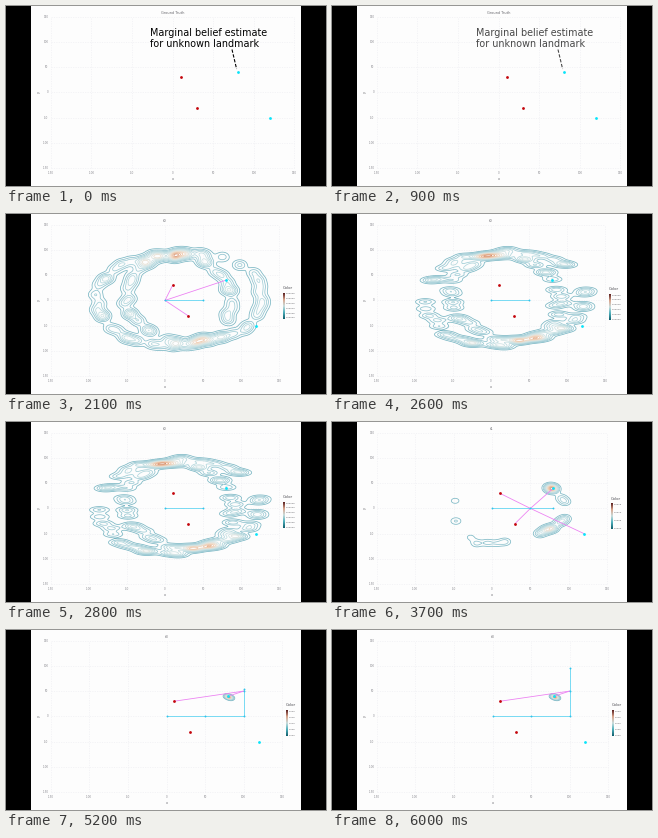
A matplotlib script that plays this animation: 320 by 180 pixels, repeating every 6.1 s.

```python
import numpy as np
import matplotlib.pyplot as plt
from matplotlib.animation import FuncAnimation
from matplotlib.colors import LinearSegmentedColormap
from matplotlib.patches import Rectangle

W, H, DPI = 320, 180, 100
PX = 72 / DPI
FRAMES, INTERVAL = 61, 100
SPEED = 5  # data units per frame
Y0, UNIT_Y = 86.4, 0.506

RED, CYAN, PINK, GREY = "#c4060c", "#08e4fa", "#ec80f2", "#8c8c92"
HEAT = LinearSegmentedColormap.from_list(
    "heat", ["#62a9b8", "#8fc3ce", "#b4d8de", "#d3e4e4", "#ecdccb", "#eebf9c", "#cf7f5c"])
BAR = LinearSegmentedColormap.from_list(
    "bar", ["#12606e", "#4fb0bc", "#c9dcdc", "#d9a58c", "#5c2020"])

KNOWN = [(10, 30), (30, -30)]
UNKNOWN = [(80, 40), (120, -50)]

fig = plt.figure(figsize=(W / DPI, H / DPI), dpi=DPI, facecolor="black")
ax = fig.add_axes([0, 0, 1, 1])
ax.axis("off")
ax.add_patch(Rectangle((25, 0), 270, H, color="#fdfdfd", lw=0, zorder=0))


def label(x, y, text, size, color=GREY, **kw):
    kw = {"ha": "center", "va": "center", **kw}
    return ax.text(x, y, text, fontsize=size * PX, color=color,
                   family="DejaVu Sans", **kw)


def ring(rng, cx, cy, r, n, gaps=(), hot=0):
    """Kernels (x, y, weight) scattered along a circle, heavier near one angle."""
    out = []
    for a in np.linspace(0, 360, n, endpoint=False) + rng.uniform(-4, 4, n):
        a %= 360
        if any(lo < a < hi for lo, hi in gaps):
            continue
        off = abs((a - hot + 180) % 360 - 180)
        weight = rng.uniform(0.55, 0.85) + 0.35 * np.exp(-(off / 14) ** 2)
        rad = r + rng.normal(0, 2.5)
        t = np.radians(a)
        out.append((cx + rad * np.cos(t), cy + rad * np.sin(t), weight))
    return out


class Scene:
    def __init__(self, start, cx, step, title, kernels=(), sigma=(6, 6), low=0.1,
                 legend=None, viewer=None, seen=()):
        self.start, self.cx, self.unit = start, cx, step / 50
        self.items = []
        self.axes(title)
        if kernels:
            self.belief(kernels, sigma, low)
        if legend:
            self.legend(*legend)
        for x, y in seen:
            xs, ys = self.px(np.array([viewer[0], x]), np.array([viewer[1], y]))
            self.add(ax.plot(xs, ys, color=PINK, lw=0.8 * PX, zorder=4))
        for pts, color in ((KNOWN, RED), (UNKNOWN, CYAN)):
            xs, ys = self.px(*np.array(pts).T)
            self.add(ax.plot(xs, ys, "o", color=color, ms=2.8 * PX, mew=0, zorder=6))

    def px(self, x, y):
        return self.cx + x * self.unit, Y0 - y * UNIT_Y

    def add(self, items):
        self.items += items

    def axes(self, title):
        ticks = np.arange(-150, 151, 50)
        xs, ys = self.px(ticks, ticks)
        grid = dict(color="#eeeef2", lw=0.6 * PX, ls=(0, (2, 2)), zorder=1)
        for v, x, y in zip(ticks, xs, ys):
            self.add(ax.plot([x, x], [ys[0], ys[-1]], **grid))
            self.add(ax.plot([xs[0], xs[-1]], [y, y], **grid))
            self.add([label(x, 167, str(v), 2.7),
                      label(42.5, y, str(v), 2.7, ha="right")])
        self.add([label(self.cx, 6.5, title, 3.5, "#66666c"),
                  label(self.cx, 173, "x", 3.5, "#66666c"),
                  label(32.5, Y0, "y", 3.5, "#66666c", rotation=90)])

    def belief(self, kernels, sigma, low):
        gx, gy = np.meshgrid(np.arange(70, 270, 0.5), np.arange(22, 148, 0.5))
        x, y = (gx - self.cx) / self.unit, (Y0 - gy) / UNIT_Y
        z = sum(w * np.exp(-((x - kx) / sigma[0]) ** 2 / 2 - ((y - ky) / sigma[1]) ** 2 / 2)
                for kx, ky, w in kernels)
        z /= z.max()
        self.add([ax.contour(gx, gy, z, levels=np.linspace(low, 0.95, 12), cmap=HEAT,
                             vmin=0, vmax=1, linewidths=0.75 * PX, zorder=3)])

    def legend(self, x, y, values):
        self.add([label(x, y, "Color", 3.8, "#4c4c52", ha="left")])
        self.add([ax.imshow(np.linspace(1, 0, 64)[:, None], cmap=BAR, vmin=0, vmax=1,
                            extent=(x + 0.3, x + 1.7, y + 31, y + 5), aspect="auto", zorder=3)])
        for v, ty in zip(values, np.linspace(y + 6, y + 30, len(values))):
            self.add([label(290, ty, v, 2.4, "#606066", ha="right")])

    def show(self, on):
        for item in self.items:
            item.set_visible(on)


rng = np.random.default_rng(12)
rings = (ring(rng, -1, 0, 89, 42, [(318, 326)], hot=95)
         + ring(rng, 38, 7, 89, 42, [(52, 62), (213, 224), (238, 246)], hot=280))
smeared = (ring(rng, 3, 0, 89, 42, [(158, 166), (172, 178), (184, 190)], hot=98)
           + ring(rng, 35, 9, 88, 42, [(14, 20), (27, 33), (178, 186), (200, 206)], hot=285))
right = [(76, 41, 0.6), (79, 38, 0.6), (90, 21, 0.22), (95, 13, 0.25),
         (62, -50, 0.3), (70, -43, 0.5), (78, -39, 0.6), (89, -27, 0.4), (95, -20, 0.3)]
left = [(-48, 15, 0.15), (-47, -25, 0.2), (-28, -57, 0.13), (-20, -69, 0.22),
        (-6, -68, 0.2), (6, -69, 0.16), (17, -66, 0.24)]
tight = [(81, 38, 1), (78, 40, 0.6), (84, 36, 0.5)]

fine = ["0.00025", "0.00020", "0.00015", "0.00010", "0.00005", "0.00000"]
mid = ["0.0015", "0.0010", "0.0005", "0.0000"]
coarse = ["0.020", "0.015", "0.010", "0.005", "0.000"]

scenes = [
    Scene(0, 166.6, 40.6, "Ground Truth"),
    Scene(10, 159, 38.1, "t0", rings, (6.3, 6.8), 0.08, (277, 74, fine),
          viewer=(0, 0), seen=KNOWN + UNKNOWN[:1]),
    Scene(22, 159, 38.1, "t0", smeared, (8.5, 4.2), 0.08, (277, 75, fine)),
    Scene(29, 160, 38.4, "t1", right + left, (5.5, 5.5), 0.09, (279, 76.5, mid),
          viewer=(50, 0), seen=KNOWN + UNKNOWN),
    Scene(41, 160.5, 38.6, "t2", right + left[3:], (5.5, 5.5), 0.09, (280, 75, mid)),
    Scene(51, 160.5, 38.6, "t3", tight, (2.3, 2.5), 0.06, (280, 75, coarse),
          viewer=(100, 50), seen=[KNOWN[0], UNKNOWN[0]]),
]

path, = ax.plot([], [], color="#66d6f2", lw=0.85 * PX, zorder=5)
stops, = ax.plot([], [], "o", color="#30c4ea", ms=1.9 * PX, mew=0, zorder=7)

note = [label(144, y, s, 9.6, "black", ha="left", va="baseline", zorder=9)
        for y, s in ((30.2, "Marginal belief estimate"), (41.4, "for unknown landmark"))]
note += ax.plot([226, 230.6], [43.5, 63], color="black", lw=1.1 * PX,
                ls=(0, (3, 1.5)), zorder=9)

ax.set_xlim(0, W)
ax.set_ylim(H, 0)


def walk(frame):
    """Corner points of the route travelled so far."""
    s = np.clip(SPEED * (frame - 11), 0, 50) + max(0, SPEED * (frame - 31))
    marks = [m for m in (0, 50, 100, 150) if m < s] + [s]
    s = np.array(marks, float)
    return np.minimum(s, 100), np.maximum(s - 100, 0)


def draw(frame):
    current = max((s for s in scenes if s.start <= frame), key=lambda s: s.start)
    for s in scenes:
        s.show(s is current)
    xy = current.px(*walk(frame))
    for line in (path, stops):
        line.set_data(*xy)
        line.set_visible(frame >= 10)
    fade = np.clip((frame - 2) / 14, 0, 1)
    for item in note:
        item.set_alpha(1 - fade ** 1.8)
    return []


anim = FuncAnimation(fig, draw, frames=FRAMES, interval=INTERVAL,
                     init_func=lambda: draw(0), repeat=True, repeat_delay=0)
plt.show()
```
